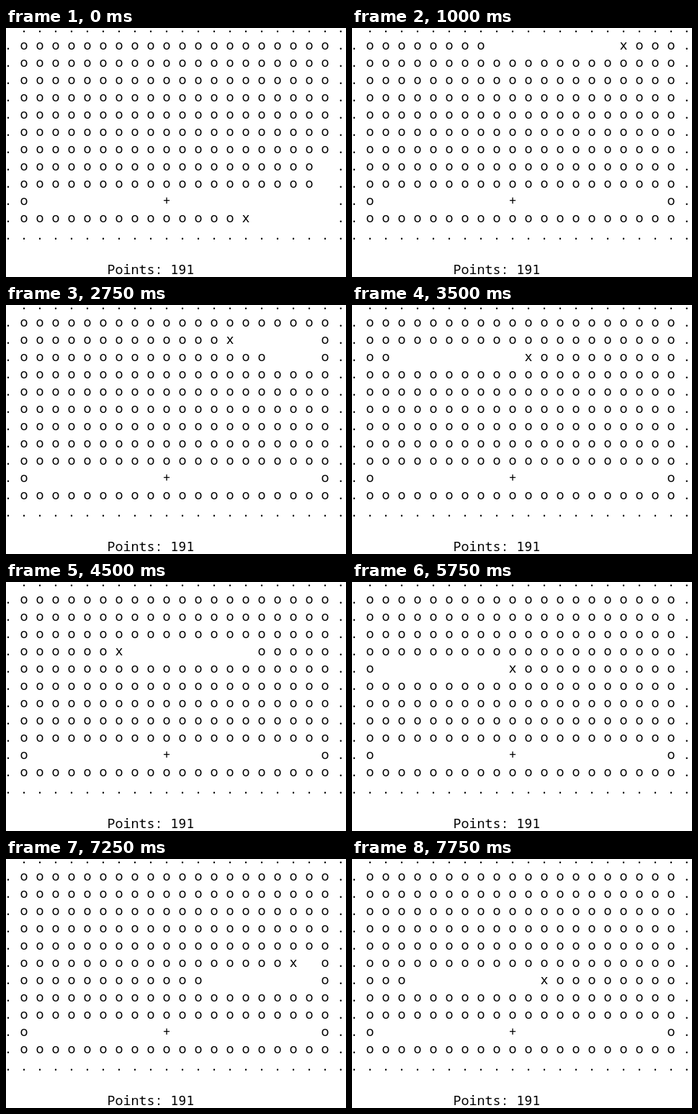
Recreate the animation shown at these times as an HTML page. Size 472 px wide and 346 px high, loop 8 s.

```html
<!DOCTYPE html>
<html lang="en">
<head>
<meta charset="utf-8">
<title>Console snake</title>
<style>
  html, body { margin: 0; width: 472px; height: 346px; overflow: hidden; background: #fff; }
  pre {
    position: absolute; left: -2.5px; top: -13px; margin: 0; color: #000;
    font: 18.333px/24px "Noto Sans Mono", "DejaVu Sans Mono", monospace;
    font-variant-ligatures: none;
  }
  span { font: 17.6px/0 "DejaVu Sans Mono", monospace; letter-spacing: .4px; }
</style>
</head>
<body>
<pre><b id="board" style="font-weight: 400"></b>

             Points: <span>191</span></pre>
<script>
const COLS = 20, ROWS = 11, GAP = 8;
const STEP = 250, LOOP = 8000;
const START = 14.33, SPEED = 4.42; // cells along the route, cells per step

const range = n => [...Array(n).keys()];
const key = (x, y) => y * COLS + x;

// Along the bottom, up the right edge, then zigzag down; row 9 is crossed at the left.
const route = range(COLS).map(x => key(x, ROWS - 1));
for (let y = ROWS - 2; y >= 0; y--) route.push(key(COLS - 1, y));
for (let y = 0; y < ROWS - 2; y++) {
  for (let i = 0; i < COLS - 1; i++) route.push(key(y % 2 ? i : COLS - 2 - i, y));
}
route.push(key(0, ROWS - 2));

const board = document.getElementById("board");
const wall = Array(COLS + 2).fill(".").join(" ");

function draw(step) {
  const head = Math.floor(START + SPEED * step);
  const cells = Array(COLS * ROWS).fill(" ");
  route.forEach((cell, i) => {
    if (i < head || i > head + GAP) cells[cell] = "o";
  });
  cells[route[head]] = "x";
  cells[key(9, 9)] = "+";
  const rows = range(ROWS).map(y =>
    [".", ...cells.slice(y * COLS, (y + 1) * COLS), "."].join(" "));
  board.textContent = [" " + wall.slice(1), ...rows, wall].join("\n");
}

let shown = -1;
const origin = performance.now();
function tick() {
  const step = Math.floor((performance.now() - origin) % LOOP / STEP);
  if (step !== shown) draw(shown = step);
  requestAnimationFrame(tick);
}
tick();
</script>
</body>
</html>
```
